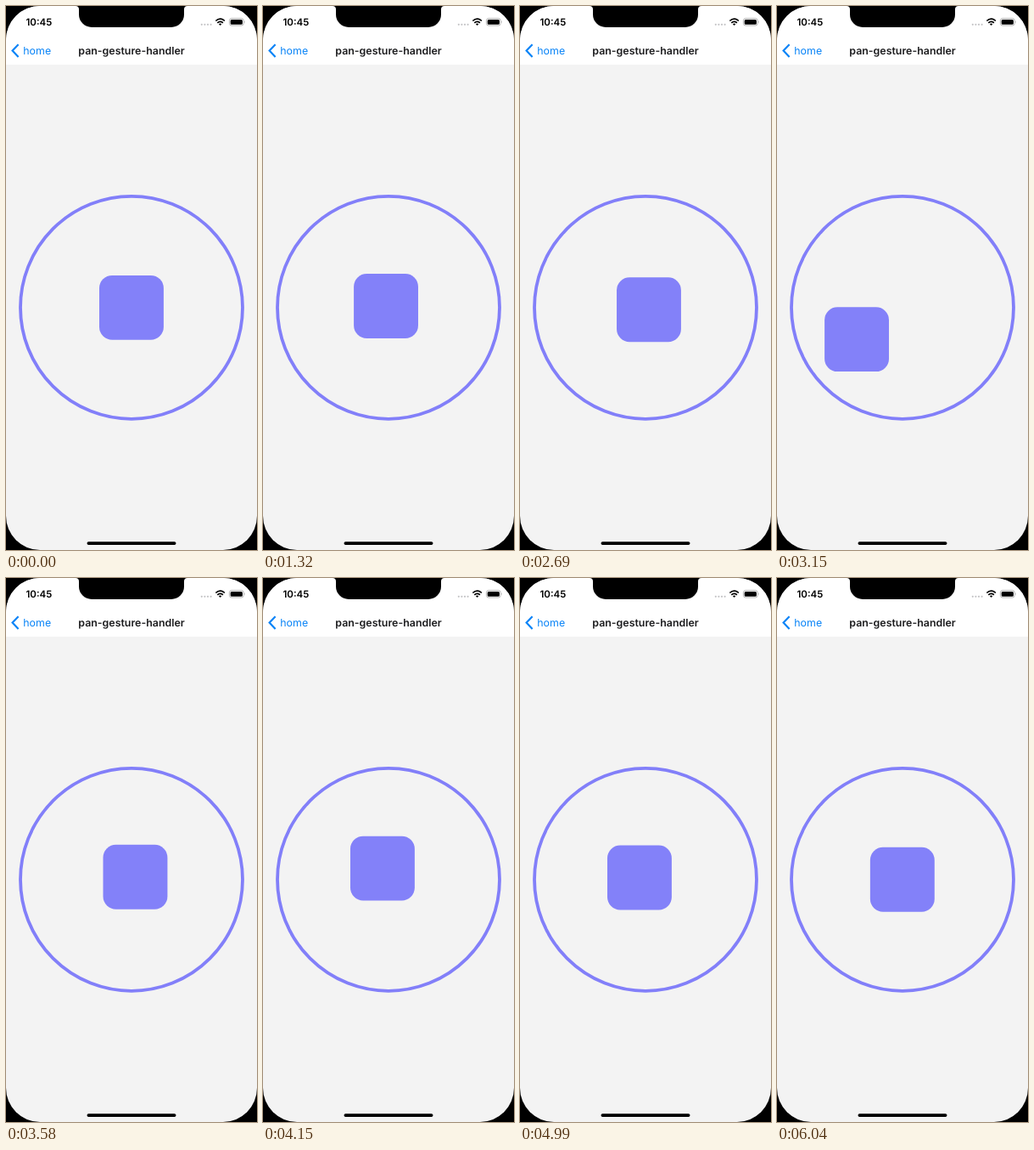
These frames come from a looping animation (296 by 640 pixels, 6.11 s). An HTML page:

```html
<!DOCTYPE html>
<html lang="en">
<head>
<meta charset="utf-8">
<title>pan-gesture-handler</title>
<style>
  html, body { margin: 0; width: 100%; height: 100%; overflow: hidden; background: #000; }
  svg { display: block; width: 100%; height: 100%; }
  text { font: 600 12.4px Inter, Roboto, sans-serif; fill: #1c1c1e; text-rendering: geometricPrecision; }
  .back { font-weight: 400; fill: #0a84f7; }
  .clock { font-size: 11.5px; fill: #000; }
</style>
</head>
<body>
<svg viewBox="0 0 296 640">
  <clipPath id="screen"><rect width="296" height="640" rx="40"/></clipPath>
  <g clip-path="url(#screen)">
    <rect width="296" height="640" fill="#f3f3f3"/>
    <rect width="296" height="69" fill="#fff"/>
    <circle cx="148" cy="354.8" r="131" fill="none" stroke="#120dff" stroke-opacity=".5" stroke-width="3.8"/>
    <rect id="box" x="110" y="316.9" width="75.9" height="75.9" rx="15.2" fill="#1510ff" fill-opacity=".5"/>
    <rect x="95.5" y="630.2" width="105" height="3.8" rx="1.9"/>
  </g>
  <path d="M82 0Q86 0 86 4V10A15 15 0 0 0 101 25H195A15 15 0 0 0 210 10V4Q210 0 214 0Z"/>

  <text class="clock" x="23.5" y="23">10:45</text>
  <path d="M230.8 21.8H243" stroke="#c4c4c6" stroke-width="2.2" stroke-linecap="round" stroke-dasharray="0 3.6"/>
  <path d="M247.3 17.5Q252.6 12.6 257.9 17.5M249.3 19.8Q252.6 16.8 255.9 19.8" fill="none" stroke="#000" stroke-width="1.7"/>
  <path d="M250.9 21.3Q252.6 19.9 254.3 21.3L252.6 23.1Z"/>
  <rect x="263.4" y="14.6" width="16.8" height="8.4" rx="2.6" fill="none" stroke="#a3a3a3" stroke-width=".8"/>
  <rect x="264.7" y="15.9" width="14.2" height="5.8" rx="1.5"/>
  <path d="M281.2 17.3Q282.4 18.8 281.2 20.3Z" fill="#a3a3a3"/>

  <path d="M14.6 45.2L7.6 52.6L14.6 60" fill="none" stroke="#0a84f7" stroke-width="2.2"/>
  <text class="back" x="20.3" y="57">home</text>
  <text x="148" y="57" text-anchor="middle">pan-gesture-handler</text>
</svg>
<script>
const LOOP = 6110;
const box = document.getElementById('box');

// Each drag pulls the box to (x, y) from rest, then lets go.
const drags = [
  { grab: 1240, release: 2163, x: -78, y: -48 },
  { grab: 2850, release: 3074, x: -65, y: 45 },
  { grab: 3620, release: 3820, x: 45.8, y: 86.5 },
  { grab: 4480, release: 4720, x: 97, y: 31.5 }
];

// The screen refreshes in steps of 110 ms and 100 ms, switching at these times.
const switches = [0, 2190, 2920, 3850, 4550];

function refreshTime(time) {
  const i = switches.findLastIndex(s => s <= time);
  const step = i % 2 ? 100 : 110;
  return time - (time - switches[i]) % step;
}

const ease = p => (1 - Math.cos(Math.PI * Math.min(p, 1))) / 2;

// Damped spring: stiffness 100, damping 10, mass 1.
function spring(ms) {
  const s = ms / 1000, w = Math.sqrt(75);
  return Math.exp(-5 * s) * (Math.cos(w * s) + 5 / w * Math.sin(w * s));
}

// The finger rests during the last 30% of each drag.
function pull({ grab, release }, t) {
  return t < release ? ease((t - grab) / (release - grab) / 0.7) : spring(t - release);
}

function draw(now) {
  const t = refreshTime(now % LOOP);
  const drag = drags.findLast(d => d.grab <= t);
  const k = drag ? pull(drag, t) : 0;
  box.setAttribute('transform', drag ? `translate(${drag.x * k} ${drag.y * k})` : '');
}

const begin = performance.now();
function frame() {
  draw(performance.now() - begin);
  requestAnimationFrame(frame);
}
frame();
</script>
</body>
</html>
```
